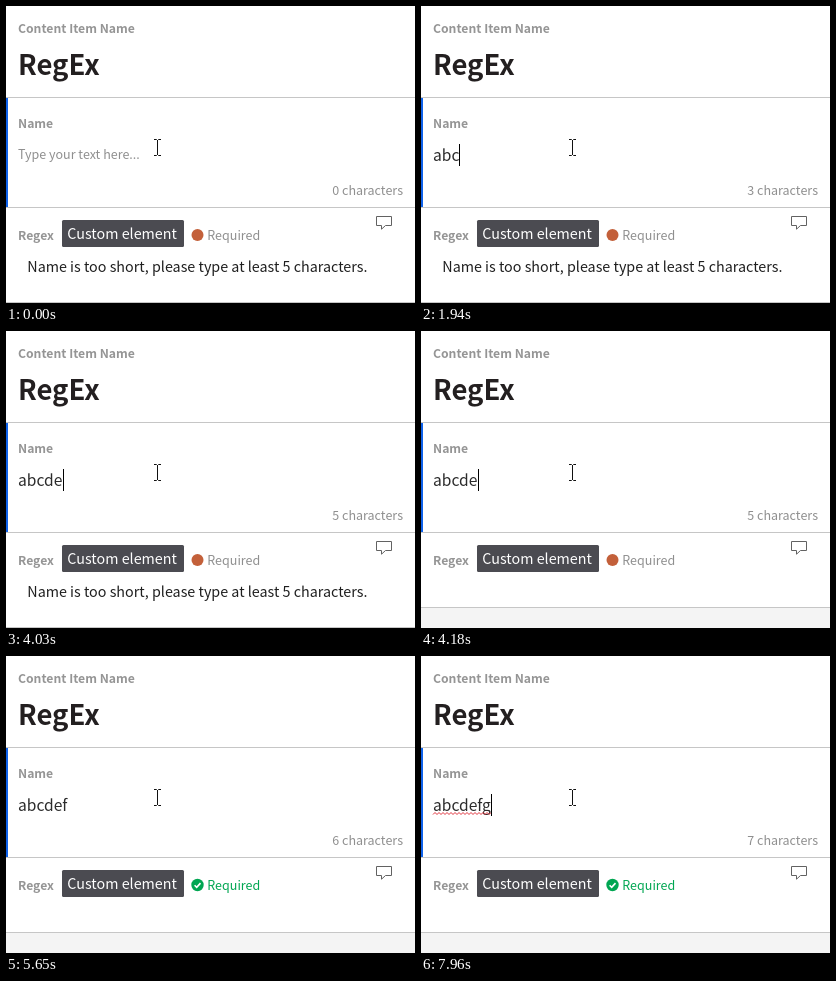
Write an HTML page that moves like this. It is 409x297 px and loops after 8000 ms.

```html
<!DOCTYPE html>
<html lang="en">
<head>
<meta charset="utf-8">
<title>Form validation</title>
<style>
  html, body { margin: 0; width: 100%; height: 100%; overflow: hidden; background: #fff; }
  svg { display: block; width: 409px; height: 297px; }
  text { font: 400 12.53px 'Noto Sans CJK SC', 'Noto Sans CJK JP', 'Noto Sans CJK', 'Open Sans', sans-serif; fill: #8f8f8f; }
  .label { font-weight: 700; font-size: 12.2px; fill: #959595; }
  .title { font-weight: 700; font-size: 27.5px; fill: #231f20; }
  .body { font-size: 14.32px; fill: #1f1f1f; }
  .typed { font-size: 15.6px; fill: #2b2b2b; }
  .rule { fill: #c6c6c6; }
</style>
</head>
<body>
<svg viewBox="0 0 409 297">
  <rect width="409" height="297" fill="#fff"/>
  <text class="label" x="12" y="27">Content Item Name</text>
  <text class="title" x="12" y="69">RegEx</text>

  <rect class="rule" y="91" width="409" height="1"/>
  <rect class="rule" y="201" width="409" height="1"/>
  <rect y="92" width="2" height="109" fill="#0f62ea"/>
  <text class="label" x="12" y="122">Name</text>
  <text id="placeholder" x="12" y="153">Type your text here...</text>
  <text id="typed" class="typed" x="12" y="155"></text>
  <path id="squiggle" fill="none" stroke="#e0323c"/>
  <rect id="caret" y="138" width="1" height="22" fill="#000"/>
  <text id="count" x="397" y="189" text-anchor="end"></text>

  <text class="label" x="12" y="234">Regex</text>
  <rect x="56" y="214" width="122" height="27" rx="1.5" fill="#4b4b51"/>
  <text class="body" x="61.3" y="233" style="fill:#fff">Custom element</text>
  <circle id="badge" cx="191.5" cy="229" r="6"/>
  <path id="check" d="M188.6 229.2l2.1 2.1 3.8-4.2" fill="none" stroke="#fff" stroke-width="1.6"/>
  <text id="required" x="201.3" y="234">Required</text>
  <path d="M370.5 210.5h15v9h-6l-4 3.7v-3.7h-5z" fill="#fff" stroke="#626262"/>
  <text id="error" class="body" x="21.3" y="266">Name is too short, please type at least 5 characters.</text>

  <rect id="below" y="277" width="409" height="20" fill="#f4f4f4"/>
  <rect id="bottom" class="rule" width="409" height="1"/>
  <path d="M148 133.5h2.5l1 1 1-1h2.5M148 149.5h2.5l1-1 1 1h2.5M151.5 134v15" fill="none" stroke="#111"/>
</svg>
<script>
const LOOP = 8000;
const LETTERS = 'abcdefgh';
const CARET_X = [12, 21, 30, 38, 48, 57, 62, 70, 80];

// Each entry is [time, value], held until the next one.
const LENGTH = [[0, 0], [310, 1], [1320, 2], [1940, 3], [2940, 4], [4030, 5], [5100, 6], [6120, 7], [6500, 8], [7880, 7]];
const COUNT = LENGTH.map(([time, n]) => [time === 310 ? 390 : time, n]);
const CARET = [[0, false], [310, true], [940, false], [1320, true], [1790, false], [1940, true], [2480, false],
  [2940, true], [3480, false], [4030, true], [4800, false], [5100, true], [5650, false], [6120, true],
  [7040, false], [7580, true]];
const MISSPELLED = [[0, false], [4800, true], [5100, false], [7580, true]];
const ERROR = [[0, true], [4180, false]];
const VALID = [[0, false], [4320, true]];

const el = id => document.getElementById(id);
const at = (track, t) => track.findLast(([time]) => time <= t)[1];
const show = (id, on) => el(id).setAttribute('visibility', on ? 'visible' : 'hidden');

function zigzag(from, to) {
  let d = `M${from} 158.5`;
  for (let x = from + 2, up = true; x <= to; x += 2, up = !up) d += `L${x} ${up ? 156.5 : 158.5}`;
  return d;
}

function draw(t) {
  const length = at(LENGTH, t);
  const error = at(ERROR, t);
  const valid = at(VALID, t);

  el('typed').textContent = LETTERS.slice(0, length);
  el('count').textContent = `${at(COUNT, t)} characters`;
  el('caret').setAttribute('x', CARET_X[length]);
  el('squiggle').setAttribute('d', zigzag(12, CARET_X[length]));
  show('placeholder', length === 0);
  show('caret', at(CARET, t));
  show('squiggle', at(MISSPELLED, t));

  show('error', error);
  show('below', !error);
  el('bottom').setAttribute('y', error ? 296 : 276);

  show('check', valid);
  el('badge').setAttribute('r', valid ? 6.2 : 6);
  el('badge').style.fill = valid ? '#00a652' : '#c3603a';
  el('required').style.fill = valid ? '#00a652' : '#8f8f8f';
}

const start = performance.now();
function tick() {
  draw((performance.now() - start) % LOOP);
  requestAnimationFrame(tick);
}
tick();
</script>
</body>
</html>
```
